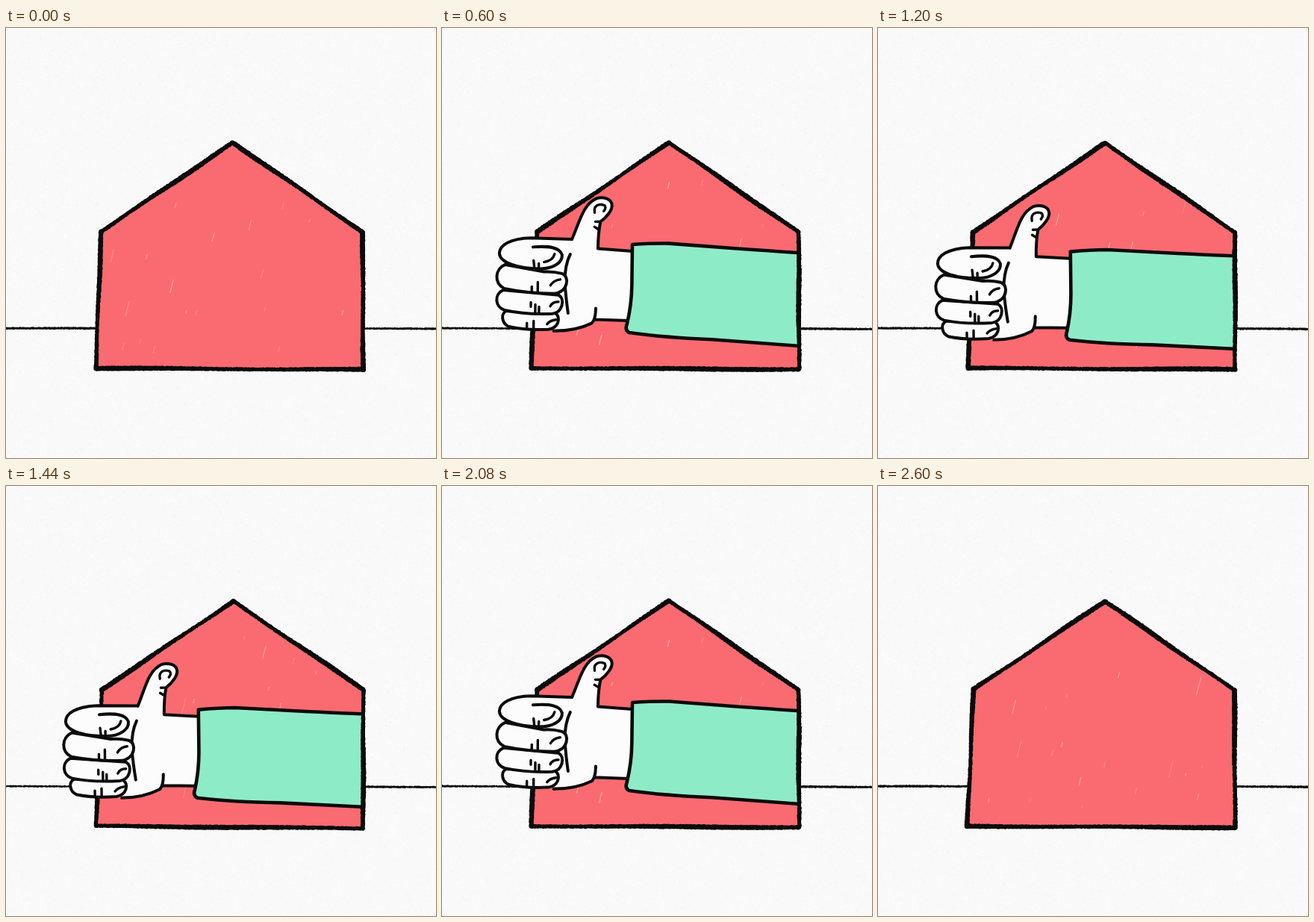
Animation of 576 by 576 pixels, one loop 2640 ms. Source, as an HTML page with a canvas:

```html
<!DOCTYPE html>
<html lang="en">
<head>
<meta charset="utf-8">
<title>Thumbs up house</title>
<style>
  html, body { margin: 0; width: 100%; height: 100%; overflow: hidden; background: #f9f9f9; }
  canvas { display: block; }
</style>
</head>
<body>
<canvas id="stage" width="576" height="576"></canvas>
<script>
const ctx = document.getElementById('stage').getContext('2d');
const LOOP = 2640, STEP = 40, DRAWINGS = 5, HOLD = 4;
const INK = '#0b0b0b', RED = '#f96b70', GREEN = '#8eebc8';
const WALL_X = 476;
const HOUSE = [[304, 154], [478, 273], [478.5, 458], [120, 455.5], [127.5, 273]];

const sleeve = new Path2D('M256 294Q283 292 305 292Q350 295 400 298T510 304L510 429Q430 424 364 420Q300 418 253 412Q247 409 250 401Q256 375 256 348Z');
const palm = new Path2D('M258 303L210 300Q211 275 213 264C221 258 229 248 228 241C227 233 216 230 207 233C190 241 186 261 175 288L120 287L140 408Q185 412 207 395L256 396Z');
const fingers = [
  'M89 385C80 388 82 402 92 406Q115 411 145 409C158 407 162 394 154 387Z',
  'M84 357C71 363 73 380 86 384Q115 390 150 388C164 386 167 368 158 363Z',
  'M86 323C72 329 71 348 85 355Q115 361 152 361C171 359 173 337 162 334Q150 331 138 332Z',
  'M175 288L120 287C92 288 78 297 78 308C79 321 104 328 132 328C151 328 163 319 162 309C159 299 145 297 123 299'
].map(d => new Path2D(d));
const handLines = new Path2D(
  'M175 288C186 261 190 241 207 233C216 230 227 233 228 241C229 248 221 258 213 264Q210 278 210 300L256 303' +
  'M152 411Q181 411 203 400Q208 395 208 380M207 395L252 396' +
  'M173 308Q166 322 166 345Q168 368 171 387');
const details = new Path2D(
  'M205 252C203 243 210 239 218 242Q221 245 217 250M206 264L212 264M205 271L210 274' +
  'M124 317L125 326M131 321V327M138 319Q150 317 152 308' +
  'M122 352V359M130 346V359M147 350Q151 343 160 342' +
  'M121 373V379M127 376V387M132 379V386M147 378Q150 372 158 372' +
  'M116 401V408M125 398V409M143 402Q147 397 155 396');

function randomizer(seed) {
  let s = seed * 7919 + 17;
  return () => (s = (s * 16807) % 2147483647) / 2147483647;
}

const paper = document.createElement('canvas');
paper.width = paper.height = 576;
{
  const p = paper.getContext('2d'), rnd = randomizer(3);
  p.fillStyle = '#f9f9f9';
  p.fillRect(0, 0, 576, 576);
  for (let i = 0; i < 12000; i++) {
    p.fillStyle = rnd() < 0.5 ? 'rgba(0,0,0,.012)' : 'rgba(255,255,255,.35)';
    p.fillRect(rnd() * 576, rnd() * 576, 2, 2);
  }
}

// Stamps overlapping dots along a line for a rough crayon edge.
function crayon([x0, y0], [x1, y1], radius, seed) {
  const rnd = randomizer(seed), phase = rnd() * 6;
  const length = Math.hypot(x1 - x0, y1 - y0);
  const nx = (y0 - y1) / length, ny = (x1 - x0) / length;
  ctx.fillStyle = INK;
  ctx.beginPath();
  for (let d = 0; d <= length; d++) {
    const k = d / length;
    const off = Math.sin(k * 9 + phase) * 0.4 + (rnd() - 0.5) * 0.5;
    const r = radius * (1 + Math.sin(k * 6 + phase * 2) * 0.13) + (rnd() - 0.5) * 0.6;
    const x = x0 + (x1 - x0) * k + nx * off, y = y0 + (y1 - y0) * k + ny * off;
    ctx.moveTo(x + r, y);
    ctx.arc(x, y, r, 0, 7);
  }
  ctx.fill();
}

function flecks(seed) {
  const rnd = randomizer(seed);
  ctx.lineCap = 'round';
  for (let i = 0; i < 18; i++) {
    const x = 140 + rnd() * 320, roof = 175 + Math.abs(x - 304) * 0.67;
    const y = roof + rnd() * (442 - roof), h = 3 + rnd() * rnd() * 26;
    ctx.strokeStyle = `rgba(255,235,232,${0.12 + rnd() * 0.35})`;
    ctx.lineWidth = 0.7 + rnd();
    ctx.beginPath();
    ctx.moveTo(x, y);
    ctx.lineTo(x + h * 0.25, y - h);
    ctx.stroke();
  }
}

function shape(path, fill, width) {
  ctx.fillStyle = fill;
  ctx.fill(path);
  if (width) line(path, width);
}

function line(path, width) {
  ctx.strokeStyle = INK;
  ctx.lineWidth = width;
  ctx.lineCap = ctx.lineJoin = 'round';
  ctx.stroke(path);
}

// Arm pose: slides in, settles downwards, then plays the same way back.
function armPose(time) {
  const t = Math.min(time, LOOP - time);
  const left = 1 - Math.min(1, Math.max(0, (t - 80) / 480));
  const k = Math.min(1, left / 0.7), lift = k * k * (3 - 2 * k);
  const s = Math.min(1, Math.max(0, (t - 560) / 760));
  const settle = (1 - Math.cos(Math.PI * s ** 1.2)) / 2;
  return {
    x: 406 * left ** 2.13 - 1 + 3 * settle,
    y: -4 + 18 * lift + 10.5 * settle,
    angle: (0.7 - 7.2 * lift - 1.5 * settle) * Math.PI / 180
  };
}

function drawArm(time) {
  const { x, y, angle } = armPose(time);
  ctx.save();
  ctx.beginPath();
  ctx.rect(0, 0, WALL_X, 576);
  ctx.clip();
  ctx.translate(258 + x, 293 + y);
  ctx.rotate(angle);
  ctx.translate(-258, -293);
  shape(palm, '#fcfcfc');
  line(handLines, 4);
  fingers.forEach(f => shape(f, '#fcfcfc', 4));
  line(details, 3.4);
  shape(sleeve, GREEN, 4.6);
  ctx.restore();
}

function draw(time) {
  const drawing = Math.floor(time / STEP / HOLD) % DRAWINGS;
  const rnd = randomizer(drawing + 40);
  const corners = HOUSE.map(([x, y]) => [x + (rnd() - 0.5) * 1.4, y + (rnd() - 0.5) * 1.4]);
  const wall = i => crayon(corners[i], corners[(i + 1) % 5], 2.9, drawing * 7 + i + 1);

  ctx.drawImage(paper, 0, 0);
  crayon([-2, 402.5], [578, 403], 1.4, drawing + 90);
  ctx.fillStyle = RED;
  ctx.beginPath();
  corners.forEach(c => ctx.lineTo(...c));
  ctx.fill();
  flecks(drawing + 60);
  for (let i = 0; i < 5; i++) wall(i);
  drawArm(time);
  wall(1);
}

function frame() {
  const time = performance.now() % LOOP;
  draw(Math.floor(time / STEP) * STEP);
  requestAnimationFrame(frame);
}
frame();
</script>
</body>
</html>
```
